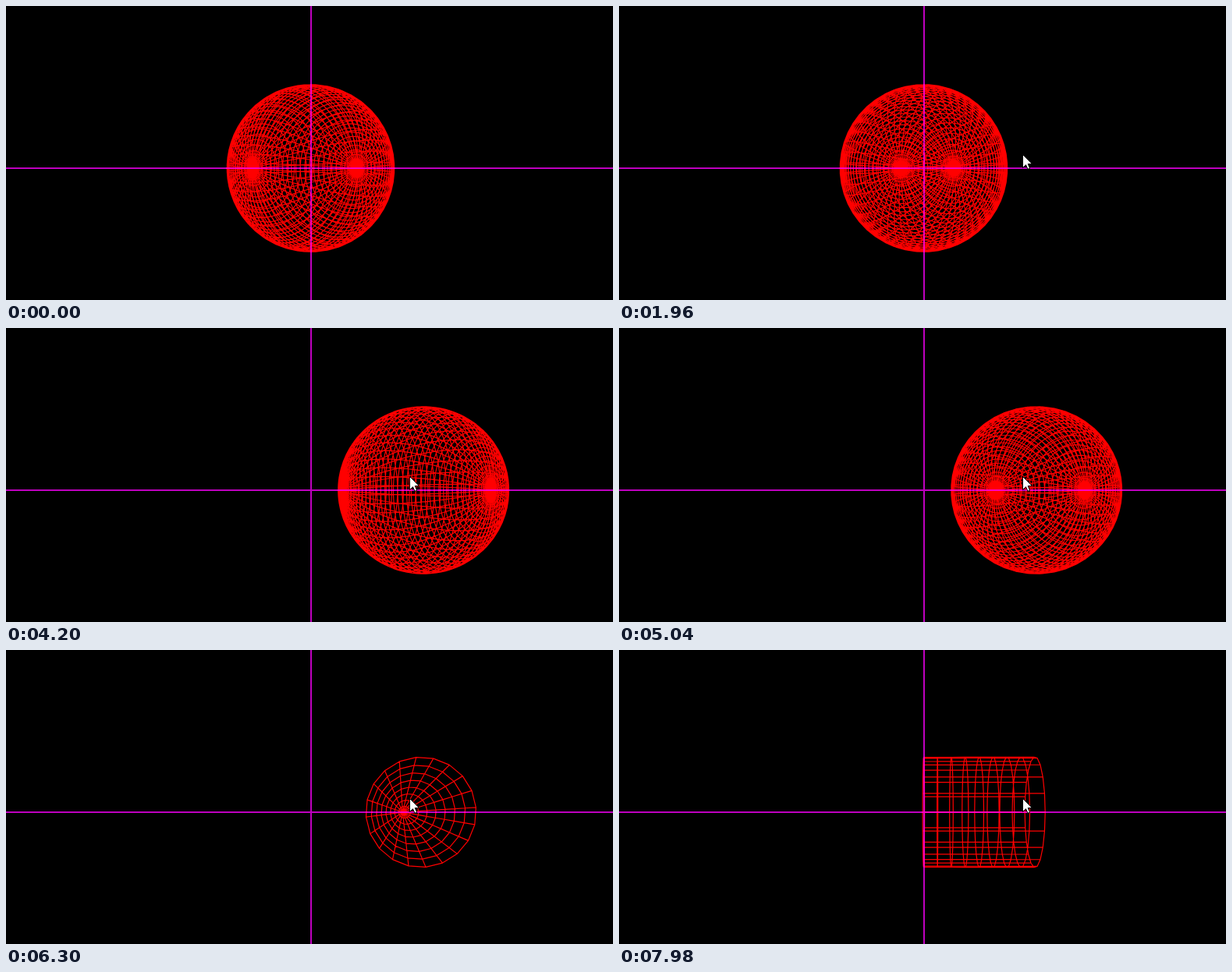
An HTML page with a canvas for the animation above (8 s loop, 778x377 px).

```html
<!DOCTYPE html>
<html lang="en">
<head>
<meta charset="utf-8">
<title>Rotating wireframe solids</title>
<style>
html, body { margin: 0; width: 778px; height: 377px; overflow: hidden; background: #000; }
canvas { display: block; }
</style>
</head>
<body>
<canvas id="stage" width="778" height="377"></canvas>
<script>
const ctx = document.getElementById('stage').getContext('2d');
const LOOP = 8000, STEP = 140;
const CX = 390.5, CY = 208, FOCAL = 707, EYE = 10;
const RATE = 16.5; // degrees per step
const TAU = Math.PI * 2;

// [step, value] pairs
const sphereTurn = [[0, -38.5], [14, 198.2], [22, 334.8], [30, 468], [36, 560], [41, 642]];
const sphereShift = [[15, 0], [16, 0.1], [17, 0.1], [18, 0.3], [22, 1.9], [26, 1.9], [27, 2]];
const cursorX = [[2, 656], [3, 610], [4, 560], [5, 517]];
const cursorY = [[2, 250], [3, 225], [4, 205], [5, 190]];

function at(keys, n) {
  if (n <= keys[0][0]) return keys[0][1];
  for (let i = 1; i < keys.length; i++) {
    const [a, va] = keys[i - 1], [b, vb] = keys[i];
    if (n <= b) return va + (vb - va) * (n - a) / (b - a);
  }
  return keys[keys.length - 1][1];
}

// Profiles return [radius, z] for v in 0..1
const sphere = { slices: 50, stacks: 50, profile: v => [1.5 * Math.sin(v * Math.PI), 1.5 * Math.cos(v * Math.PI)] };
const cone = { slices: 20, stacks: 8, profile: v => [1 - v, -2 * v] };
const cylinder = { slices: 20, stacks: 8, profile: v => [1, -2 * v] };

function rotate([x, y, z], axis, s, c) {
  if (axis === 'x') return [x, y * c - z * s, y * s + z * c];
  if (axis === 'y') return [x * c + z * s, y, z * c - x * s];
  return [x * c - y * s, x * s + y * c, z];
}

function addLine(points) {
  points.forEach(([x, y], i) => i ? ctx.lineTo(x, y) : ctx.moveTo(x, y));
}

function drawSolid({ slices, stacks, profile }, axis, degrees, shift) {
  const a = degrees * Math.PI / 180, s = Math.sin(a), c = Math.cos(a);
  const rings = [];
  for (let i = 0; i <= stacks; i++) {
    const [r, h] = profile(i / stacks);
    rings.push(Array.from({ length: slices }, (_, j) => {
      const t = j / slices * TAU; // slices start at the top
      const [x, y, z] = rotate([r * Math.sin(t), r * Math.cos(t), h], axis, s, c);
      const k = FOCAL / (EYE - z);
      return [CX + (x + shift) * k, CY - y * k];
    }));
  }
  ctx.strokeStyle = '#f00';
  ctx.lineWidth = 1.2;
  ctx.lineJoin = 'round';
  ctx.beginPath();
  for (const ring of rings) {
    addLine(ring);
    ctx.closePath();
  }
  for (let j = 0; j < slices; j++) addLine(rings.map(ring => ring[j]));
  ctx.stroke();
}

function drawAxes() {
  ctx.globalCompositeOperation = 'lighter';
  ctx.fillStyle = '#bf00bf';
  ctx.fillRect(0, 207, 778, 2);
  ctx.fillRect(390, 0, 2, 207);
  ctx.fillRect(390, 209, 2, 168);
  ctx.globalCompositeOperation = 'source-over';
}

const arrow = new Path2D('M.5 .5V17.5L4.5 13.7L7 19.3L9.6 18.2L7.2 12.6H12.5Z');

function drawCursor(n) {
  if (n < 2) return;
  ctx.save();
  ctx.translate(at(cursorX, n), at(cursorY, n));
  ctx.fillStyle = '#fff';
  ctx.strokeStyle = '#000';
  ctx.lineWidth = 1;
  ctx.fill(arrow);
  ctx.stroke(arrow);
  ctx.restore();
}

function draw(n) {
  ctx.fillStyle = '#000';
  ctx.fillRect(0, 0, 778, 377);
  if (n < 42) drawSolid(sphere, 'y', at(sphereTurn, n), at(sphereShift, n));
  else if (n < 46) drawSolid(cone, 'z', 59 + RATE * (n - 45), 2);
  else if (n < 52) drawSolid(cone, 'x', 89 + RATE * (n - 51), 2);
  else drawSolid(cylinder, 'y', 89 + RATE * (n - 57), 2);
  drawAxes();
  drawCursor(n);
}

let shown = -1;
const start = performance.now();
function tick() {
  const n = Math.floor((performance.now() - start) % LOOP / STEP);
  if (n !== shown) draw(shown = n);
  requestAnimationFrame(tick);
}
tick();
</script>
</body>
</html>
```
